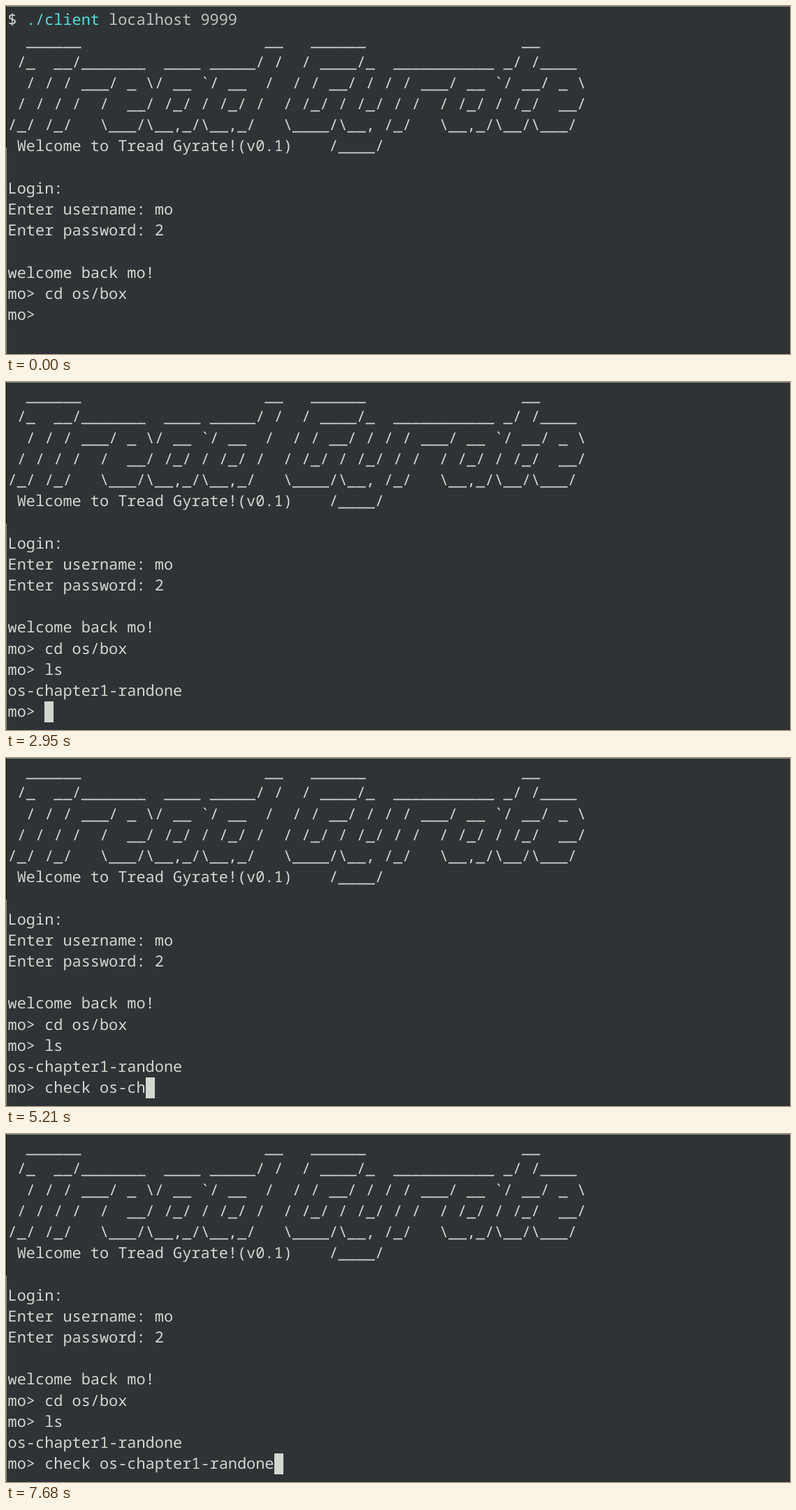
An HTML page for the animation above (8 s loop, 1122 px wide and 499 px high).

```html
<!DOCTYPE html>
<html lang="en">
<head>
<meta charset="utf-8">
<title>Terminal session</title>
<style>
  :root { --row: 30.21px; }
  html, body { margin: 0; width: 100%; height: 100%; overflow: hidden; background: #2e3436; }
  #stage { position: relative; width: 1122px; height: 499px; overflow: hidden; background: #2e3436; }
  #screen {
    position: absolute; left: 2.6px; top: 5.11px;
    font: 21.9px/var(--row) "Noto Sans Mono", monospace;
    color: #d3d7cf; white-space: pre;
    text-rendering: geometricPrecision; font-variant-ligatures: none;
  }
  #command { height: var(--row); }
  .program { color: #5cdada; }
  .args { color: #c0c4bd; }
  #cursor { position: absolute; width: 13.2px; height: 30.2px; background: #d3d7cf; }
  .edge { position: absolute; left: 0; }
  .top { top: 0; width: 100%; height: 1px; background: #858989; }
  .dark { top: 1px; width: 1px; height: 202px; background: #0c0e0f; }
  .light { top: 203px; width: 1px; bottom: 0; background: #909494; }
</style>
</head>
<body>
<div id="stage">
  <div id="screen"><div id="command">$ <span class="program">./client</span> <span class="args">localhost 9999</span></div><div id="output"></div></div>
  <div id="cursor"></div>
  <div class="edge top"></div>
  <div class="edge dark"></div>
  <div class="edge light"></div>
</div>
<script>
const LOOP = 8000, SCROLL = 2950;
const CELL = 13.14, ROW = 30.2, LEFT = 2.6, TOP = 5;
const PROMPT = "mo> ";

const left = String.raw`
  ______                    __
 /_  __/_______  ____ _____/ /
  / / / ___/ _ \/ __ ~/ __  /
 / / / /  /  __/ /_/ / /_/ /
/_/ /_/   \___/\__,_/\__,_/`;

const right = String.raw`
   ______                 __
  / ____/_  ___________ _/ /____
 / / __/ / / / ___/ __ ~/ __/ _ \
/ /_/ / /_/ / /  / /_/ / /_/  __/
\____/\__, /_/   \__,_/\__/\___/`;

// "~" stands for a backtick inside the template strings
const artRows = s => s.replace(/~/g, "`").split("\n").slice(1);
const rightRows = artRows(right);
const banner = artRows(left).map((row, i) => row.padEnd(30) + rightRows[i]);

const intro = [
  ...banner,
  " Welcome to Tread Gyrate!(v0.1)    /____/",
  "",
  "Login:",
  "Enter username: mo",
  "Enter password: 2",
  "",
  "welcome back mo!",
  PROMPT + "cd os/box"
];
const listing = [PROMPT + "ls", "os-chapter1-randone"];

// Key press times, one per character
const first = { text: "ls", keys: [2680, 2750] };
const second = {
  text: "check os-chapter1-randone",
  keys: [3750, 3810, 3880, 4080, 4210, 4350, 4680, 4750, 4940, 5140, 5210,
    5610, 5725, 5840, 5955, 6070, 6270, 6490, 6670,
    6950, 7080, 7280, 7410, 7550, 7680]
};
// The cursor flips at each of these times, starting hidden
const flips = [330, 930, 1530, 2130, 2610, 3540, 3680];

const command = document.getElementById("command");
const output = document.getElementById("output");
const cursor = document.getElementById("cursor");
const passed = (times, t) => times.filter(x => x <= t).length;
let shown = "";

function draw(t) {
  const scrolled = t >= SCROLL;
  const entry = scrolled ? second : first;
  const line = PROMPT + entry.text.slice(0, passed(entry.keys, t));
  const lit = passed(flips, t) % 2 === 1;
  const state = [scrolled, line, lit].join("|");
  if (state === shown) return;
  shown = state;

  command.style.display = scrolled ? "none" : "block";
  output.textContent = [...intro, ...(scrolled ? listing : []), line].join("\n");
  cursor.style.visibility = lit ? "visible" : "hidden";
  cursor.style.left = LEFT + line.length * CELL + "px";
  cursor.style.top = TOP + (scrolled ? 15 : 14) * ROW + "px";
}

const start = performance.now();
function tick() {
  draw((performance.now() - start) % LOOP);
  requestAnimationFrame(tick);
}
tick();
</script>
</body>
</html>
```
